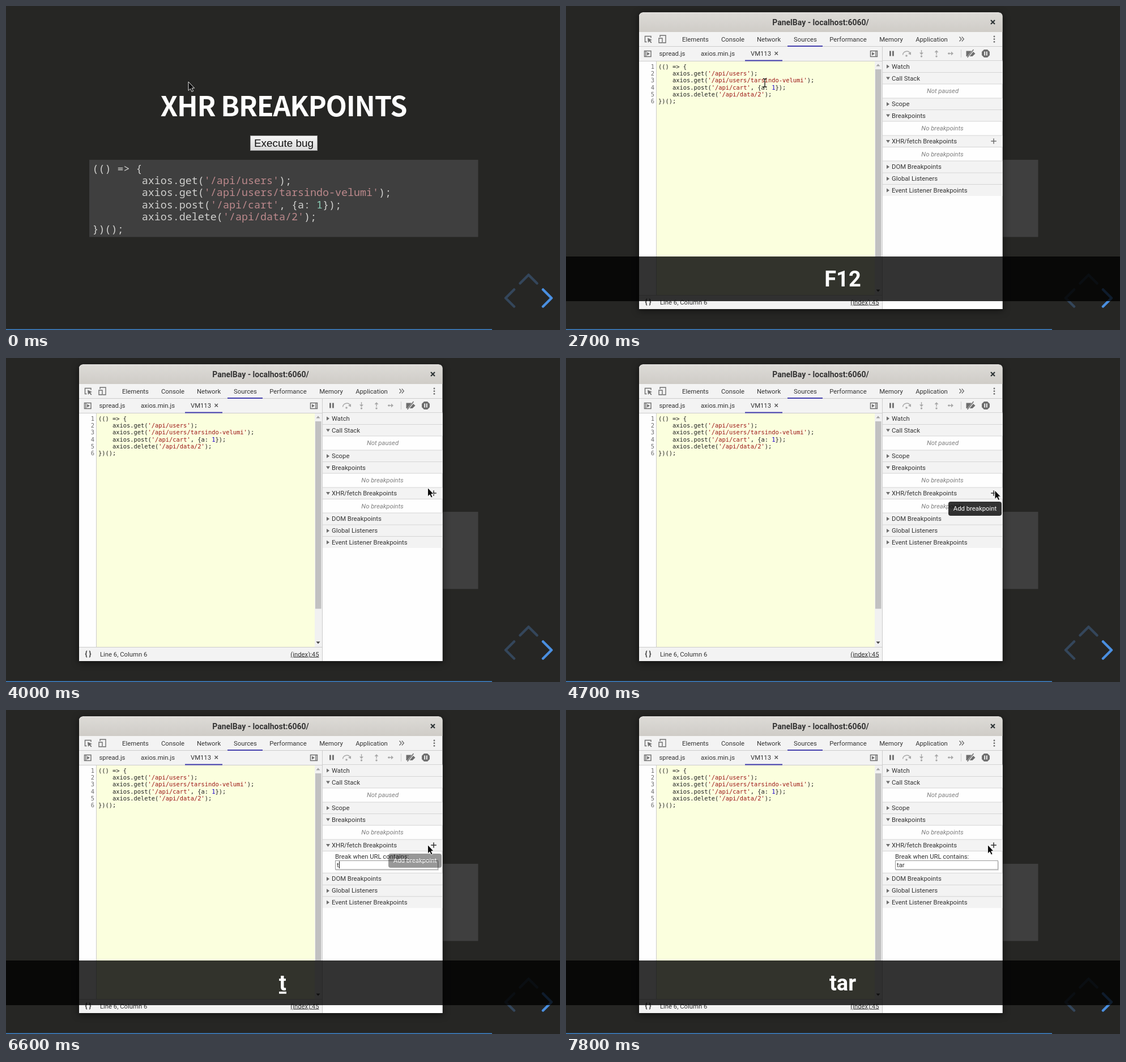
Write an HTML page that moves like this. It is 978 px wide and 573 px high and loops after 8000 ms.

```html
<!DOCTYPE html>
<html lang="en">
<head>
<meta charset="utf-8">
<title>XHR breakpoints</title>
<style>
  html, body { margin: 0; width: 100%; height: 100%; overflow: hidden; background: #262624; }
  svg { display: block; width: 978px; height: 573px; }
  text { white-space: pre; font: 11.3px Roboto, sans-serif; fill: #333; }
  .mid { text-anchor: middle; }
  .end { text-anchor: end; }
  .line { fill: none; stroke: #6e6e6e; stroke-width: 1.4; }
  .solid { fill: #6e6e6e; }
  .rule { fill: none; stroke: #ccc; }
  .note { font-style: italic; fill: #808080; }
  .heading { font: 600 48.5px "Noto Sans CJK JP", "Noto Sans CJK SC", "Noto Sans CJK", "Open Sans", sans-serif; letter-spacing: -1.2px; fill: #fff; }
  .button { font: 18.9px "Liberation Sans", Arial, sans-serif; fill: #111; }
  .slide-code text { font: 18.35px "Noto Sans Mono", monospace; fill: #d0d0ce; }
  .slide-code .str { fill: #bc898c; }
  .slide-code .num { fill: #8cd0b8; }
  .editor text { font: 10.4px "DejaVu Sans Mono", monospace; fill: #222; }
  .editor .str { fill: #9c1414; }
  .editor .num { fill: #1c00cf; }
  .editor .gutter { fill: #6d6d6d; }
  .frame { filter: drop-shadow(0 2px 6px rgba(0, 0, 0, .5)); }
  .title { font: bold 14px Roboto, sans-serif; }
  .braces { font: bold 12px Roboto, sans-serif; }
  .keys { font: bold 38px Roboto, sans-serif; fill: #fff; }
  #last { text-decoration: underline; }
</style>
</head>
<body>
<svg viewBox="0 0 978 573">
  <defs>
    <linearGradient id="face" x2="0" y2="1"><stop stop-color="#f6f6f6"/><stop offset="1" stop-color="#dadada"/></linearGradient>
    <linearGradient id="bar" x2="0" y2="1"><stop stop-color="#dddbd7"/><stop offset="1" stop-color="#cfccc7"/></linearGradient>
  </defs>

  <rect width="978" height="573" fill="#262624"/>
  <text class="heading mid" x="490" y="195">XHR BREAKPOINTS</text>
  <rect x="431.5" y="229.5" width="118" height="26" fill="url(#face)" stroke="#9a9a9a"/>
  <text class="button mid" x="490.5" y="249">Execute bug</text>
  <rect x="147" y="272" width="686.5" height="136.5" fill="#3f3f3f"/>
  <g class="slide-code" id="slideCode"></g>
  <g fill="none" stroke="#34465b" stroke-width="4.5" stroke-linecap="round" stroke-linejoin="round">
    <path d="M907.5 490.5L922.5 475.5L937.5 490.5"/>
    <path d="M897 501.5L882 516.5L897 531.5"/>
    <path d="M948 501.5L963 516.5L948 531.5" stroke="#4a8fe0"/>
  </g>
  <rect y="571.5" width="858" height="1.5" fill="#3f86cf"/>

  <g id="win">
    <path class="frame" d="M128.5 536.5V18a7 7 0 0 1 7-7H764a7 7 0 0 1 7 7V536.5Z" fill="#f3f3f3" stroke="#1a1a19"/>
    <path d="M129 46V18a6.5 6.5 0 0 1 6.5-6.5H764a6.5 6.5 0 0 1 6.5 6.5V46Z" fill="url(#bar)"/>
    <path d="M135 12H764" stroke="#eceae7"/>
    <text class="title mid" x="449.5" y="34">PanelBay - localhost:6060/</text>
    <path d="M750 25L757 32M757 25L750 32" stroke="#2e3436" stroke-width="2.2"/>

    <!-- main toolbar -->
    <g id="tabs"></g>
    <path class="line" d="M142.5 63.5H139.5V53.5H150V56.5"/>
    <path class="solid" d="M144 56.5L152 60L148.7 61.2L151.5 64.5L150 65.5L147.3 62.3L145 65Z"/>
    <path class="line" d="M166 55V52H176V65H171M164 57H170V65H164Z"/>
    <path class="line" d="M694.5 54.5L698 58.5L694.5 62.5M698.8 54.5L702.3 58.5L698.8 62.5"/>
    <g class="solid"><circle cx="756" cy="54" r="1.4"/><circle cx="756" cy="58.7" r="1.4"/><circle cx="756" cy="63.4" r="1.4"/></g>
    <path class="rule" d="M129 71.5H770"/>
    <rect x="391" y="70" width="62" height="2" fill="#4540ad"/>

    <!-- file tabs and debugger buttons -->
    <path class="line" d="M138.5 79.5H150V89.5H138.5ZM141 79.5V89.5"/>
    <path class="solid" d="M143 81.5L148 84.5L143 87.5Z"/>
    <path class="line" d="M537.5 79.5H549.5V89.5H537.5ZM547 79.5V89.5"/>
    <path class="solid" d="M540 81.5L545 84.5L540 87.5Z"/>
    <path d="M368.5 81L374 86.5M374 81L368.5 86.5" stroke="#555" stroke-width="1.4"/>
    <path class="solid" d="M571 79.5h2.8v9h-2.8ZM576 79.5h2.8v9h-2.8Z"/>
    <g opacity=".55">
      <path class="line" d="M594.5 86.5C595.5 79 605 78 607.5 84"/>
      <path class="solid" d="M604 84.5L609 86.5L609 81Z"/><circle class="solid" cx="601" cy="88" r="1.8"/>
      <path class="line" d="M627.5 78V84M654 86V80M674 84H682"/>
      <path class="solid" d="M624 82.5H631L627.5 86.5ZM650.5 82H657.5L654 78ZM680 80.5V87.5L684 84Z"/>
      <g class="solid"><circle cx="627.5" cy="89" r="1.7"/><circle cx="654" cy="89" r="1.7"/><circle cx="676" cy="84" r="1.7"/></g>
    </g>
    <path class="rule" d="M697.5 77V91"/>
    <path class="solid" d="M706.5 79.5H717.5L722.5 84.2L717.5 89H706.5Z"/>
    <path d="M709 91L720 77" stroke="#f3f3f3" stroke-width="3"/>
    <path class="line" d="M708.5 91L719.5 77"/>
    <path class="solid" d="M738 77H744L748 81V87L744 91H738L734 87V81Z"/>
    <path d="M739.2 80.5V87.5M742.8 80.5V87.5" stroke="#fff" stroke-width="1.7"/>

    <!-- editor -->
    <rect x="129" y="97" width="30" height="414" fill="#fefefe"/>
    <rect x="159" y="97" width="386" height="414" fill="#fbffde"/>
    <rect x="545" y="97" width="13" height="414" fill="#f1f1f1"/>
    <rect x="546" y="112" width="10.5" height="331.5" fill="#c1c1c1"/>
    <path d="M547.5 106.5H554.5L551 102.5Z" fill="#a3a3a3"/>
    <path d="M547.5 501.5H554.5L551 505.5Z" fill="#444"/>
    <path class="rule" d="M129 97.5H770M159.5 98V511M129 511.5H558"/>
    <rect x="316" y="95.5" width="66" height="2" fill="#4540ad"/>
    <g class="editor" id="editorCode"></g>
    <text class="braces mid" x="145" y="527.5">{ }</text>
    <text x="166" y="527.5">Line 6, Column 6</text>
    <text class="end" x="552.5" y="527.5" text-decoration="underline">(index):45</text>

    <!-- sidebar -->
    <rect x="559" y="98" width="211.5" height="438" fill="#fefefe"/>
    <g id="upper"></g>
    <path id="plus" d="M755 234.2V243.8M750.2 239H759.8" stroke-width="1.5"/>
    <text class="note mid" id="empty" x="664.5" y="265.5">No breakpoints</text>
    <g id="lower"></g>
    <g id="form">
      <text x="581" y="263">Break when URL contains:</text>
      <rect x="582" y="268" width="182" height="16" fill="#000" opacity=".12"/>
      <rect x="581.5" y="266.5" width="181" height="15.5" fill="#fff" stroke="#999"/>
      <text id="typed" x="584" y="277.5"></text>
      <rect id="caret" y="267.5" width="1" height="12.5" fill="#111"/>
    </g>
    <path class="rule" d="M558.5 72V536"/>
    <g id="tip">
      <rect x="675" y="254" width="94" height="25" rx="4" fill="#000" opacity=".8"/>
      <text class="mid" x="722" y="269.5" style="fill:#fff">Add breakpoint</text>
    </g>
  </g>

  <g id="overlay">
    <rect y="443" width="978" height="79" fill="#000" opacity=".8"/>
    <text class="keys mid" x="488.5" y="496"><tspan id="head"></tspan><tspan id="last"></tspan></text>
  </g>

  <g id="cursor">
    <path id="arrow" d="M0-1V14.5L3.5 11.3L6 16.6L8.6 15.4L6.2 10.2H10.6Z" fill="#0a0a0a" stroke="#fff" stroke-width=".9"/>
    <path id="beam" d="M-3-7.5Q0-7.5 0-5.5Q0-7.5 3-7.5M0-6V6.5M-3 7.5Q0 7.5 0 5.5Q0 7.5 3 7.5" fill="none" stroke="#111" stroke-width="1.3"/>
  </g>
</svg>
<script>
const $ = id => document.getElementById(id);

function add(parent, tag, attrs, text = '') {
  const node = document.createElementNS('http://www.w3.org/2000/svg', tag);
  for (const key in attrs) node.setAttribute(key, attrs[key]);
  node.textContent = text;
  return parent.appendChild(node);
}

const code = [
  [0, '(() => {'],
  [1, "axios.get('/api/users');"],
  [1, "axios.get('/api/users/tarsindo-velumi');"],
  [1, "axios.post('/api/cart', {a: 1});"],
  [1, "axios.delete('/api/data/2');"],
  [0, '})();']
];

function drawCode(parent, x, y, step, indent) {
  code.forEach(([depth, line], i) => {
    const row = add(parent, 'text', { x: x + depth * indent, y: y + i * step });
    line.split(/('[^']*'|\b\d\b)/).forEach((part, k) => {
      const kind = k % 2 ? (part[0] === "'" ? 'str' : 'num') : '';
      add(row, 'tspan', { class: kind }, part);
    });
  });
}

drawCode($('slideCode'), 152.5, 293.5, 21.4, 87.3);
drawCode($('editorCode'), 163, 110.7, 12.3, 25);
code.forEach((_, i) => add($('editorCode'), 'text',
  { class: 'gutter end', x: 156, y: 110.7 + i * 12.3 }, i + 1));

[['Elements', 228.5], ['Console', 294.5], ['Network', 358], ['Sources', 422.5],
 ['Performance', 498], ['Memory', 574], ['Application', 645.5]]
  .forEach(([name, x]) => add($('tabs'), 'text', { class: 'mid', x, y: 62.5 }, name));
[['spread.js', 187.5], ['axios.min.js', 268], ['VM113', 344]]
  .forEach(([name, x]) => add($('tabs'), 'text', { class: 'mid', x, y: 88 }, name));

function section(parent, name, y, open) {
  add(parent, 'rect', { x: 559, y: y - 10, width: 211.5, height: 20.5, fill: '#f3f3f3' });
  add(parent, 'path', { class: 'rule', d: `M559 ${y - 10}H770.5` + (open ? `M559 ${y + 10.5}H770.5` : ''), 'stroke-opacity': .8 });
  add(parent, 'path', { class: 'solid', d: open ? `M565 ${y - 2}h7l-3.5 5Z` : `M566 ${y - 3}v7l5-3.5Z` });
  add(parent, 'text', { x: 575, y: y + 4 }, name);
}
section($('upper'), 'Watch', 106.5);
section($('upper'), 'Call Stack', 127.5, true);
section($('upper'), 'Scope', 173);
section($('upper'), 'Breakpoints', 193.5, true);
section($('upper'), 'XHR/fetch Breakpoints', 239, true);
section($('lower'), 'DOM Breakpoints', 284);
section($('lower'), 'Global Listeners', 305);
section($('lower'), 'Event Listener Breakpoints', 325.5);
add($('upper'), 'text', { class: 'note mid', x: 665, y: 154 }, 'Not paused');
add($('upper'), 'text', { class: 'note mid', x: 664.5, y: 220 }, 'No breakpoints');

// Each track holds [start ms, ...values]; a value stays until the next start.
const tracks = {
  cursor: [[0, 322, 135], [2700, 351, 136], [2800, 418, 164], [2900, 508, 203], [3000, 590, 238],
    [3100, 645, 262], [3200, 669, 270], [3600, 674, 267], [3700, 691, 257], [3800, 716, 244],
    [3900, 736, 234], [4000, 744.5, 230.5], [4200, 749, 232], [4300, 754, 234], [4400, 757, 235],
    [5500, 757.5, 236], [5900, 754, 237], [6000, 748, 239], [6100, 744.5, 239.5]],
  tip: [[0, 0], [4500, .3], [4600, .75], [4700, 1], [5500, 0],
    [6100, .5], [6200, 1], [6600, .5], [6700, .07], [6800, 0]],
  keys: [[0, '', ''], [500, '', 'F12'], [700, 'F12', ''], [3000, '', ''], [6600, '', 't'],
    [6900, 't', ''], [7100, 't', 'a'], [7200, 'ta', 'r'], [7400, 'tar', '']],
  input: [[0, '', 584], [6600, 't', 588], [7400, 'tar', 597]],
  caret: [[0, 1], [6000, 0], [6600, 1], [7800, 0]]
};
const at = (name, t) => tracks[name].findLast(step => step[0] <= t).slice(1);
const show = (id, on) => $(id).setAttribute('visibility', on ? 'inherit' : 'hidden');

function draw(t) {
  const [x, y] = at('cursor', t);
  const [head, last] = at('keys', t);
  const [typed, caretX] = at('input', t);
  const editing = t >= 5500;
  const overText = t >= 700 && x < 545;

  show('win', t >= 500);
  show('empty', !editing);
  show('form', editing);
  $('lower').setAttribute('transform', `translate(0 ${editing ? 14.3 : 0})`);
  $('plus').setAttribute('stroke', t >= 4000 ? '#333' : '#6e6e6e');
  $('typed').textContent = typed;
  $('caret').setAttribute('x', caretX);
  $('caret').setAttribute('opacity', at('caret', t)[0]);
  $('tip').setAttribute('opacity', at('tip', t)[0]);

  show('overlay', head + last);
  $('head').textContent = head;
  $('last').textContent = last;

  $('cursor').setAttribute('transform', `translate(${x} ${y})`);
  show('arrow', !overText);
  show('beam', overText);
}

const start = performance.now();
function tick() {
  draw((performance.now() - start) % 8000);
  requestAnimationFrame(tick);
}
tick();
</script>
</body>
</html>
```
